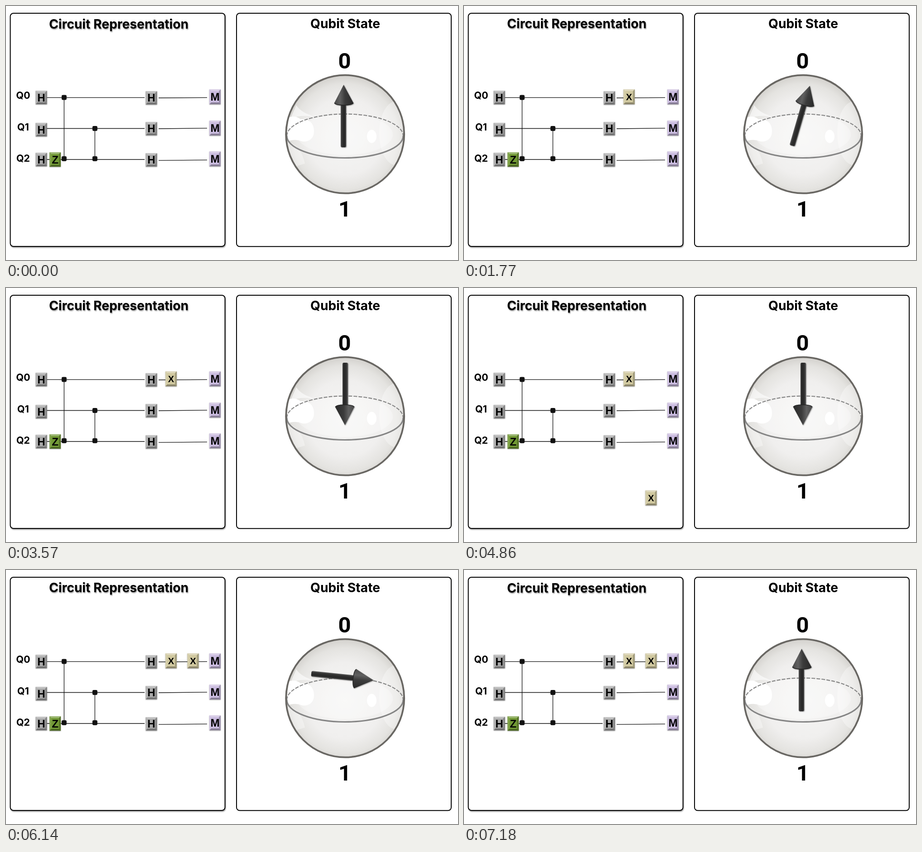
Recreate the animation shown at these times as an HTML page. Size 998 by 561 pixels, loop 8270 ms.

```html
<!DOCTYPE html>
<html lang="en">
<head>
<meta charset="utf-8">
<title>Circuit and qubit state</title>
<style>
  html, body { margin: 0; width: 100%; height: 100%; overflow: hidden; background: #fff; }
  svg { display: block; width: 998px; height: 561px; }
  text { font-family: Inter, sans-serif; font-weight: 700; }
  .title { font-size: 28.2px; text-anchor: middle; }
  .label { font-size: 21.5px; text-anchor: middle; }
  .pole { font: 700 49px Roboto, sans-serif; text-anchor: middle; }
  .gate text { font-family: "Liberation Sans", Arial, sans-serif; text-anchor: middle; }
  .panel { fill: #fff; stroke: #000; stroke-width: 2; }
  .wire { stroke: #111; stroke-width: 1.3; }
  .raised { filter: drop-shadow(1px 2px 1.2px rgba(0, 0, 0, .4)); }
  .gate { filter: drop-shadow(.5px 1px .8px rgba(0, 0, 0, .4)); }
</style>
</head>
<body>
<svg viewBox="0 0 998 561">
  <defs>
    <radialGradient id="glass" cy=".52" r=".52">
      <stop offset="0" stop-color="#f6f6f5"/>
      <stop offset=".62" stop-color="#f0efee"/>
      <stop offset=".86" stop-color="#e4e3e0"/>
      <stop offset="1" stop-color="#d3d1cd"/>
    </radialGradient>
    <linearGradient id="shaft">
      <stop offset="0" stop-color="#555"/>
      <stop offset=".3" stop-color="#303030"/>
      <stop offset=".75" stop-color="#262626"/>
      <stop offset="1" stop-color="#4a4a4a"/>
    </linearGradient>
    <linearGradient id="cone">
      <stop offset="0" stop-color="#494949"/>
      <stop offset=".3" stop-color="#606060"/>
      <stop offset=".55" stop-color="#3c3c3c"/>
      <stop offset="1" stop-color="#292929"/>
    </linearGradient>
    <clipPath id="inside"><circle cx="748.7" cy="283.2" r="130"/></clipPath>
  </defs>

  <rect class="panel raised" x="9.5" y="16" width="474" height="515" rx="7"/>
  <rect class="panel" x="509" y="16" width="474" height="515.3" rx="7"/>
  <text id="heading" class="title raised" x="249" y="50">Circuit Representation</text>
  <text class="title" x="749" y="49">Qubit State</text>
  <g id="circuit"></g>

  <text class="pole" x="747.5" y="138">0</text>
  <text class="pole" x="748" y="465">1</text>
  <circle cx="748.7" cy="283.2" r="130.5" fill="url(#glass)"/>
  <g clip-path="url(#inside)" fill="#fff">
    <path opacity=".6" d="M641 219Q652 238 692 247Q655 237 628 249Z"/>
    <ellipse opacity=".32" cx="862" cy="281" rx="38" ry="71"/>
    <path opacity=".35" d="M615 299Q650 302 660 348L640 354Z"/>
    <ellipse opacity=".28" cx="748" cy="284" rx="106" ry="45"/>
    <path d="M624 246Q640 241 650 250C673 249 680 262 680 277C680 293 668 301 654 299Q638 292 619 300Z"/>
    <ellipse cx="807.5" cy="288" rx="10.5" ry="14.5"/>
  </g>
  <g fill="none" stroke="#858585">
    <path d="M620 287A128.5 48.5 0 0 1 877 287" stroke-width="2.2" stroke-dasharray="8 3"/>
    <path d="M620 287A128.5 48.5 0 0 0 877 287" stroke-width="3.2"/>
    <circle cx="748.7" cy="283.2" r="130.5" stroke="#696763" stroke-width="3.8"/>
  </g>
  <g style="filter: drop-shadow(1.5px 1.5px 1.2px rgba(0, 0, 0, .4))">
    <g id="arrow">
      <rect x="739" y="212" width="12" height="100" rx="3" fill="url(#shaft)"/>
      <path d="M745.5 174L767 214Q764 219 746 219Q728 219 725 214Z" fill="url(#cone)"/>
      <path d="M725 214Q728 219 746 219Q764 219 767 214" fill="none" stroke="#262626" stroke-width="1.5"/>
    </g>
  </g>
</svg>
<script>
const LOOP = 8270, STEP = 40, FLY = 500, SPIN = 2000;
const GATE_Y = 184, STAGE_BOTTOM = 561;
// Each turn: its first and last moment, when the gate flies in, when and how far the arrow turns.
const turns = [
  { from: 1050, to: 3570, fly: 1075, spin: 1590, sweep: 180 },
  { from: 4740, to: 7180, fly: 4705, spin: 5205, sweep: -180 }
];
const circuit = document.getElementById('circuit');
const arrow = document.getElementById('arrow');
const heading = document.getElementById('heading');

function add(parent, tag, attrs, text = '') {
  const node = document.createElementNS('http://www.w3.org/2000/svg', tag);
  for (const key in attrs) node.setAttribute(key, attrs[key]);
  node.textContent = text;
  parent.append(node);
  return node;
}

function wire(x1, y1, x2, y2) {
  add(circuit, 'line', { class: 'wire', x1, y1, x2, y2 });
}

function gate(letter, x, y, height, fill, size = 24) {
  const group = add(circuit, 'g', { class: 'gate', transform: `translate(${x} ${y})` });
  const w = 25, h = height, b = 4;
  const bevel = (d, color, opacity) => add(group, 'path', { d, fill: color, opacity });
  add(group, 'rect', { width: w, height: h, fill });
  bevel(`M0 0H${w}L${w - b} ${b}H${b}Z`, '#fff', .3);
  bevel(`M0 0L${b} ${b}V${h - b}L0 ${h}Z`, '#fff', .12);
  bevel(`M${w} 0V${h}L${w - b} ${h - b}V${b}Z`, '#000', .22);
  bevel(`M0 ${h}L${b} ${h - b}H${w - b}L${w} ${h}Z`, '#000', .32);
  add(group, 'text', { x: w / 2, y: h / 2 + size * .36, 'font-size': size }, letter);
  return group;
}

function control(x, top, bottom) {
  wire(x, top, x, bottom);
  for (const y of [top, bottom])
    add(circuit, 'rect', { x: x - 5.5, y: y - 5.5, width: 11, height: 11, rx: 3, fill: '#111' });
}

const GRAY = '#a8a8a8', GREEN = '#719835', PURPLE = '#cabbdf', TAN = '#d0c89f';
const rows = [
  { label: 'Q0', baseline: 205, y: 202.3, tail: [203, 202.3], h: [187, 188], m: 184 },
  { label: 'Q1', baseline: 275, y: 270.5, tail: [271, 269.8], h: [258, 256], m: 253 },
  { label: 'Q2', baseline: 344, y: 339, tail: [341.2, 340.2], h: [324, 325], m: 321 }
];
for (const { label, baseline, y, tail, h, m } of rows) {
  add(circuit, 'text', { class: 'label', x: 37.8, y: baseline }, label);
  wire(88, y, 306, y);
  wire(337, tail[0], 444, tail[1]);
  gate('H', 65.5, h[0], 30, GRAY);
  gate('H', 308.5, h[1], 29.5, GRAY);
  gate('M', 449, m, 33, PURPLE);
}
gate('Z', 96, 323, 32, GREEN);
control(128.3, 202, 337.3);
control(196.3, 270.5, 337.3);
const flyers = [352, 400.5].map(x => ({ x, node: gate('X', x, GATE_Y, 33, TAN, 20) }));

const clamp = value => Math.min(1, Math.max(0, value));

function draw(now) {
  const time = now % LOOP;
  let angle = 0;
  turns.forEach(({ from, to, fly, spin, sweep }, i) => {
    const t = time >= to ? Infinity : from + Math.floor((time - from) / STEP) * STEP;
    const rise = t < from ? 0 : clamp((t - fly) / FLY);
    const y = STAGE_BOTTOM + 4 + (GATE_Y - STAGE_BOTTOM - 4) * rise;
    flyers[i].node.setAttribute('transform', `translate(${flyers[i].x} ${y})`);
    angle += sweep * clamp((t - spin) / SPIN);
  });
  arrow.setAttribute('transform', `rotate(${angle} 747 238.5)`);
  heading.setAttribute('y', time >= turns[0].from && time < turns[1].to ? 49.3 : 50);
}

const start = performance.now();
function frame() {
  draw(performance.now() - start);
  requestAnimationFrame(frame);
}
draw(0);
requestAnimationFrame(frame);
</script>
</body>
</html>
```
